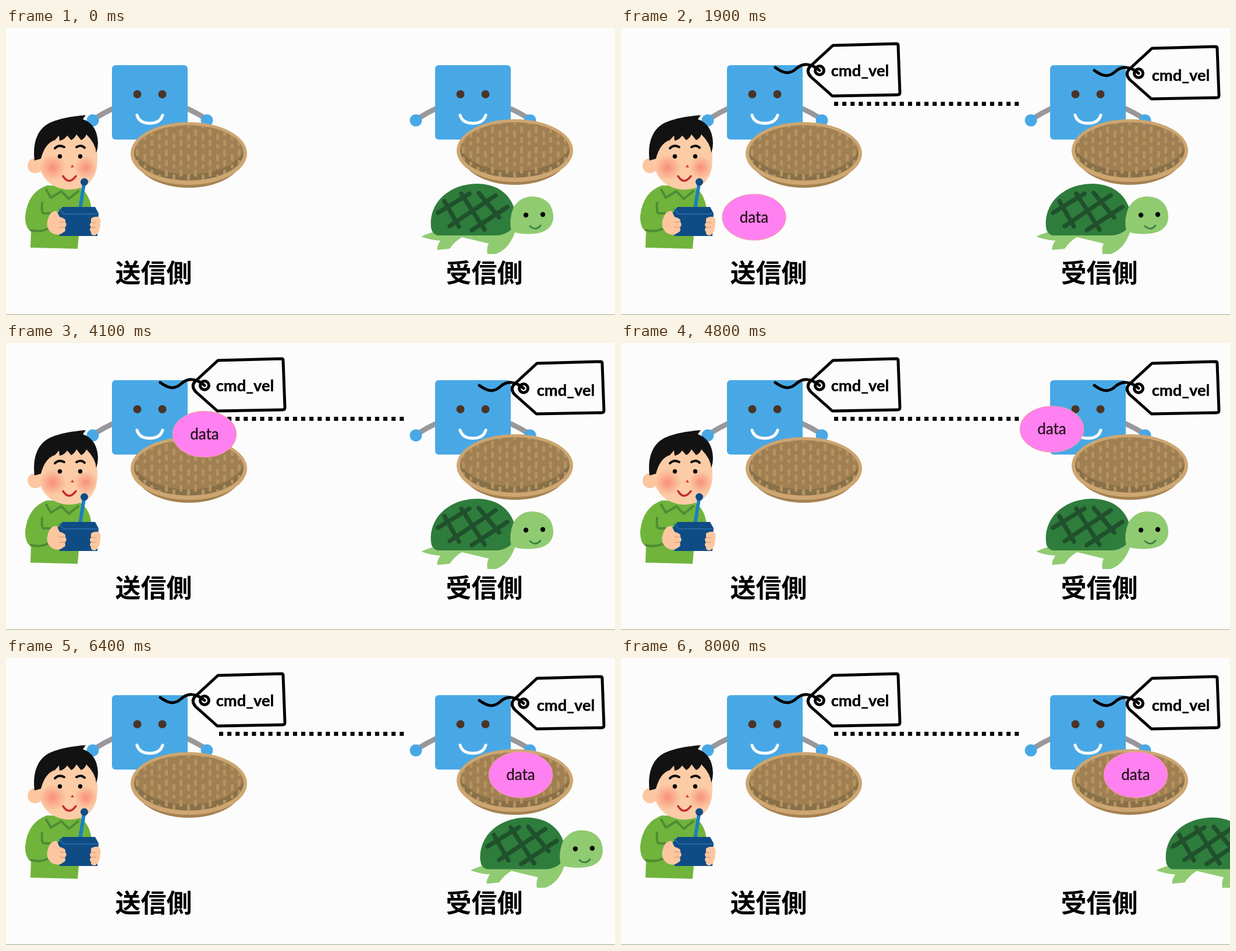
Recreate the animation shown at these times as an HTML page. Size 1046 px wide and 494 px high, loop 8100 ms.

```html
<!DOCTYPE html>
<html lang="ja">
<head>
<meta charset="utf-8">
<title>cmd_vel</title>
<style>
  html, body { margin: 0; width: 100%; height: 100%; overflow: hidden; background: #fcfcfc; }
  svg { display: block; width: 1046px; height: 494px; }
  .line { fill: none; stroke-linecap: round; stroke-linejoin: round; }
  .ink { stroke: #000; stroke-width: 5; }
  .label { font: 700 44px "Noto Sans CJK JP", "Noto Sans CJK", sans-serif; text-anchor: middle; }
  .topic { font: 700 27.3px Lato, sans-serif; text-anchor: middle; stroke: #000; stroke-width: .4px; }
  .data { font: 400 26px Lato, sans-serif; text-anchor: middle; fill: #201018; stroke: #201018; stroke-width: .3px; }
</style>
</head>
<body>
<svg viewBox="0 0 1046 494">
  <defs>
    <pattern id="weave" width="25" height="35" x="220" y="172" patternUnits="userSpaceOnUse">
      <g fill="#b5935f">
        <rect x="3" y="2" width="5" height="12" rx="2"/>
        <rect x="16" y="10" width="5" height="12" rx="2"/>
        <rect x="3" y="20" width="5" height="11" rx="2"/>
        <rect x="16" y="28" width="5" height="7" rx="2"/>
      </g>
    </pattern>
    <clipPath id="bowl"><ellipse cx="314" cy="215" rx="94" ry="47.500"/></clipPath>
    <radialGradient id="blush">
      <stop offset="0" stop-color="#f88f78"/><stop offset="1" stop-color="#f88f78" stop-opacity="0"/>
    </radialGradient>

    <g id="robot">
      <path class="line" stroke="#98989c" stroke-width="9" d="M183 139Q168 146 154 155M312 139Q327 146 340 154"/>
      <g fill="#48a8e6">
        <circle cx="149" cy="159" r="10.500"/><circle cx="345" cy="159" r="10.500"/>
        <rect x="182" y="64" width="130" height="128" rx="6"/>
      </g>
      <g fill="#4b3426"><circle cx="225.500" cy="114" r="7"/><circle cx="268.500" cy="114" r="7"/></g>
      <path class="line" stroke="#fff" stroke-width="5" d="M225 150Q229 164 247 164Q265 164 269 150"/>
    </g>

    <g id="basket">
      <ellipse cx="314" cy="222" rx="92" ry="53" fill="#a58152"/>
      <ellipse cx="314" cy="216" rx="100" ry="54" fill="#cda671"/>
      <g clip-path="url(#bowl)">
        <rect x="214" y="162" width="200" height="110" fill="#887049"/>
        <ellipse cx="314" cy="199" rx="97" ry="53" fill="#a08053"/>
        <rect x="214" y="162" width="200" height="110" fill="url(#weave)"/>
      </g>
    </g>

    <g id="tag" class="line ink">
      <path d="M364 30L473 27Q476 27 476 30L479 111Q479 115 475 115L363 117L326 84Q317 74 325 66Z"/>
      <circle cx="341" cy="73" r="7.500"/>
      <path d="M265 68C280 79 290 80 301 70S326 60 341 73"/>
    </g>
  </defs>

  <rect width="1046" height="494" fill="#fcfcfc"/>
  <rect y="493" width="1046" height="1" fill="#a5a58c"/>

  <use href="#robot"/>
  <use href="#robot" x="555"/>
  <use href="#basket"/>
  <use href="#basket" x="560" y="-5"/>

  <g id="boy">
    <path fill="#70b43c" d="M70 271Q37 283 33 324Q33 345 43 350L42 378L123 380L125 357L147 318Q147 287 124 272Z"/>
    <path class="line" stroke="#4f8c35" stroke-width="4" d="M69 278L77 292L95 281L108 294L124 281M62 301Q60 321 67 319L79 319M43 348Q59 352 73 345"/>
    <ellipse cx="50" cy="237" rx="13" ry="13" fill="#fcc7a0"/>
    <path fill="#fccca6" d="M54 198L56 230Q60 262 85 273Q110 284 135 272Q157 261 157 225L155 180Q105 158 60 180Z"/>
    <circle cx="80" cy="240" r="23" fill="url(#blush)"/><circle cx="137" cy="240" r="20" fill="url(#blush)"/>
    <path fill="#121212" d="M49 228C45 194 56 171 78 162Q99 153 137 150L132 157Q157 166 158 198Q158 207 155 215Q154 199 138 183Q136 190 129 193L121 183Q118 190 112 193L105 185Q101 192 92 194L91 185L84 193Q67 198 60 225Z"/>
    <path class="line" stroke="#121212" stroke-width="4" d="M84 207Q91 200 100 205M121 205Q129 200 135 206"/>
    <circle cx="92.500" cy="221" r="3.700"/><circle cx="127.500" cy="221" r="3.700"/>
    <path fill="#d8402b" d="M111 240L114 235L117 240Z"/>
    <path class="line" stroke="#c42a30" stroke-width="3.500" d="M98 255Q108 271 120 255"/>
    <path class="line" stroke="#1b7fc0" stroke-width="6" d="M127 312L134 268"/>
    <circle cx="134.500" cy="265" r="6.500" fill="#0f4c86"/>
    <path fill="#0f4c86" d="M97 308H153L159 319L157 358H92L89 318Z"/>
    <path class="line" stroke="#2668a0" stroke-width="2" d="M92 312L99 320H157"/>
    <path fill="#fcc7a0" d="M72 329Q76 314 87 315L92 325Q104 328 102 334Q106 340 101 343Q104 350 98 352Q90 359 79 353Q67 344 72 329ZM146 328Q151 324 159 325Q164 329 162 337Q162 352 153 357Q145 357 146 351Q142 347 146 343Q142 338 146 335Z"/>
    <path class="line" stroke="#e5a37b" stroke-width="1.500" d="M92 334H101M92 343H101M147 335H154M147 343H154"/>
  </g>

  <text class="label" x="253.500" y="437.500">送信側</text>
  <text class="label" x="821.500" y="437.500">受信側</text>

  <g id="tags">
    <use href="#tag"/>
    <use href="#tag" x="548" y="5"/>
    <text class="topic" x="410.500" y="82.500">cmd_vel</text>
    <text class="topic" x="961.500" y="90.500">cmd_vel</text>
  </g>
  <path id="link" d="M366 130.500H683.500" stroke="#000" stroke-width="7" stroke-dasharray="7.050"/>

  <g id="turtle">
    <path fill="#90cb72" d="M713 359Q731 350 750 349L866 346L874 352Q864 381 841 389L827 389Q825 379 829 371L783 360Q771 367 762 380L741 382Q739 377 746 366Q729 365 713 359Z"/>
    <path fill="#2e7d3c" d="M730 343C726 302 759 268 811 268C850 269 875 293 876 330Q872 353 845 357L741 357Q731 354 730 343Z"/>
    <path class="line" stroke="#20502c" stroke-width="7.500" d="M742 318L796 285M762 341L841 288M800 348L861 308M753 298L778 342M782 285L822 347M812 284L847 326"/>
    <path fill="#90cb72" d="M903 290C928 290 940 306 940 325C940 343 926 353 906 354Q885 356 868 350Q863 330 872 308Q884 290 903 290Z"/>
    <circle cx="893" cy="322" r="4.200"/><circle cx="922" cy="321" r="4.200"/>
    <path class="line" stroke="#3b8240" stroke-width="3" d="M900 341Q910 350 918 340"/>
  </g>

  <g id="data">
    <ellipse rx="54.500" ry="39.500" fill="#ff80f0" stroke="#f49ab0" stroke-width="1.300"/>
    <text class="data" y="9">data</text>
  </g>
</svg>
<script>
  const LOOP = 8100, STEP = 100;
  const [tags, link, data, turtle] = ["tags", "link", "data", "turtle"].map(id => document.getElementById(id));

  // Each stop is [progress, x, y].
  const toBasket = [[0, 223, 336], [1, 292, 206]];
  const toReceiver = [[0, 292, 206], [.18, 341, 157], [.33, 382, 130], [.67, 690, 130], [1, 884, 201]];
  const walk = [[0, 2.5, 6.5], [1, 206, 6.5]];

  const span = (t, start, length) => Math.min(1, Math.max(0, (t - start) / length));
  const ease = u => u < .5 ? 2 * u * u : 1 - 2 * (1 - u) ** 2;

  function along(path, u) {
    const i = Math.max(1, path.findIndex(stop => stop[0] >= u));
    const [u0, x0, y0] = path[i - 1], [u1, x1, y1] = path[i];
    const k = (u - u0) / (u1 - u0);
    return [x0 + (x1 - x0) * k, y0 + (y1 - y0) * k];
  }

  function place(node, [x, y]) {
    node.setAttribute("transform", `translate(${x} ${y})`);
  }

  function draw(t) {
    tags.style.opacity = span(t, 0, 500);
    link.style.opacity = span(t, 500, 500);
    data.style.opacity = span(t, 1000, 500);
    place(data, t < 3500
      ? along(toBasket, ease(span(t, 1500, 2000)))
      : along(toReceiver, ease(span(t, 3500, 2000))));
    place(turtle, t < 5500 ? [0, 0] : along(walk, ease(span(t, 5500, 2000))));
  }

  const begin = performance.now();
  function tick() {
    const t = (performance.now() - begin) % LOOP;
    draw(Math.floor(t / STEP) * STEP);
    requestAnimationFrame(tick);
  }
  tick();
</script>
</body>
</html>
```
